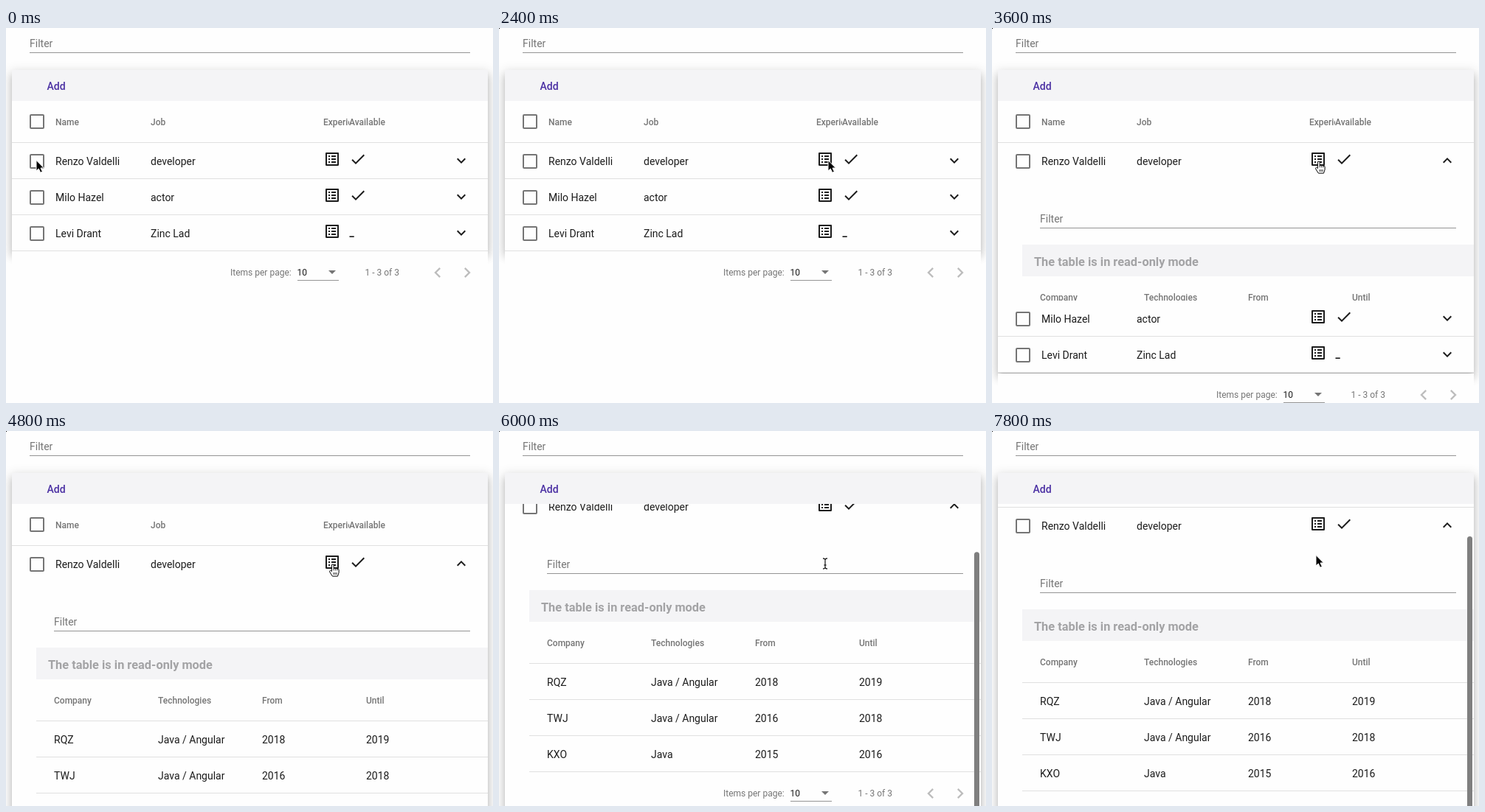
An HTML page for the animation above (8 s loop, 660x509 px).

```html
<!DOCTYPE html>
<html lang="en">
<head>
<meta charset="utf-8">
<title>Expandable table</title>
<style>
  html, body { margin: 0; width: 100%; height: 100%; overflow: hidden; background: #fefefe; }
  #view { position: relative; width: 100%; height: 100%; overflow: hidden; contain: strict; }
  #card {
    position: absolute; left: 8px; top: 57px; width: 645px; background: #fefefe;
    box-shadow: 0 5px 5px -3px #0003, 0 8px 10px 1px #00000024, 0 3px 14px 2px #0000001f;
  }
  svg { position: absolute; left: 0; top: 0; width: 660px; height: 509px; overflow: hidden; }
  text { font: 14px Roboto, sans-serif; fill: #1c1c1c; white-space: pre; }
  .hint { fill: #757575; }
  .head { font-size: 12px; font-weight: 500; fill: #757575; }
  .small { font-size: 12px; fill: #757575; }
  .dark { fill: #1c1c1c; }
  .bold { font-weight: 700; }
  .add { font-weight: 500; fill: #4a2fa3; }
  .title { font-size: 16.38px; font-weight: 700; fill: #a3a3a5; }
  .icon { fill: #1c1c1c; }
</style>
</head>
<body>
<div id="view">
  <div id="card"></div>
  <svg id="stage" viewBox="0 0 660 509"></svg>
</div>
<script>
const LIST = 'M19 5v14H5V5h14m1.1-2H3.9c-.5 0-.9.4-.9.9v16.2c0 .4.4.9.9.9h16.2c.4 0 .9-.5.9-.9V3.9c0-.5-.5-.9-.9-.9zM11 7h6v2h-6zm0 4h6v2h-6zm0 4h6v2h-6zM7 7h2v2H7zm0 4h2v2H7zm0 4h2v2H7z';
const CHECK = 'M9 16.2L4.8 12l-1.4 1.4L9 19 21 7l-1.4-1.4z';
const DOWN = 'M7.41 8.59L12 13.17l4.59-4.58L18 10l-6 6-6-6z';
const UP = 'M7.41 15.41L12 10.83l4.59 4.58L18 14l-6-6-6 6z';
const LEFT = 'M15.41 7.41L14 6l-6 6 6 6 1.41-1.41L10.83 12z';
const RIGHT = 'M10 6L8.59 7.41 13.17 12l-4.58 4.59L10 18l6-6z';

const text = (x, y, label, kind = '') => `<text x="${x}" y="${y}" class="${kind}">${label}</text>`;
const rect = (x, y, w, h, fill) => `<rect x="${x}" y="${y}" width="${w}" height="${h}" fill="${fill}"/>`;
const icon = (x, y, d, id = '') => `<path class="icon" id="${id}" d="${d}" transform="translate(${x} ${y})"/>`;
const rule = (y, x = 8) => rect(x, y, 653 - x, 1, '#e0e0e0');
const checkbox = y => `<rect x="33" y="${y - 9}" width="18" height="18" rx="1" fill="none" stroke="#757575" stroke-width="2"/>`;
const filterField = (x, y) => text(x, y, 'Filter', 'hint') + rect(x, y + 7, 629 - x, 1, '#949494');

const row = (y, name, job, available, id) =>
  checkbox(y) + text(67, y + 5, name) + text(196, y + 5, job) + icon(430, y - 15, LIST) +
  (available ? icon(465, y - 15, CHECK) : text(465.5, y + 3, '_', 'bold')) + icon(605, y - 13, DOWN, id);

const detailRow = (y, cells, kind) =>
  cells.map((cell, i) => text(65 + 141 * i, y, cell, kind)).join('');

const paginator = () =>
  text(304, 336, 'Items per page:', 'small') + text(394.5, 336, '10', 'small dark') +
  '<path d="M437 329h10l-5 5z" fill="#757575"/>' + rect(395, 342, 56, 1, '#949494') +
  text(486.5, 336, '1 - 3 of 3', 'small') +
  `<path d="${LEFT}" transform="translate(571 318) scale(1.167)" fill="#bdbdbd"/>` +
  `<path d="${RIGHT}" transform="translate(611 318) scale(1.167)" fill="#bdbdbd"/>`;

const detail = filterField(65, 264) +
  rect(41, 294, 612, 43, '#f4f4f6') + text(57, 323, 'The table is in read-only mode', 'title') +
  detailRow(370, ['Company', 'Technologies', 'From', 'Until'], 'head') + rule(393, 41) +
  [['RQZ', 'Java / Angular', 2018, 2019],
   ['TWJ', 'Java / Angular', 2016, 2018],
   ['KXO', 'Java', 2015, 2016]]
    .map((cells, i) => detailRow(424 + 49 * i, cells) + rule(442 + 49 * i, 41)).join('') +
  `<g transform="translate(0 238)">${paginator()}</g>`;

const stage = document.getElementById('stage');
stage.innerHTML = `
  <clipPath id="body"><rect x="0" y="99" width="653" height="410"/></clipPath>
  <clipPath id="reveal"><rect id="revealBox" x="8" y="205" width="645" height="0"/></clipPath>
  <clipPath id="column"><rect x="430" y="118" width="35" height="20"/></clipPath>
  ${filterField(32, 26)}
  <g clip-path="url(#body)"><g id="content">
    ${checkbox(127)}
    ${text(67, 132, 'Name', 'head')}${text(196, 132, 'Job', 'head')}
    <g clip-path="url(#column)">${text(430, 132, 'Experience', 'head')}</g>
    ${text(465, 132, 'Available', 'head')}${rule(155)}
    ${row(181, 'Renzo Valdelli', 'developer', true, 'toggle')}
    <g id="firstRule">${rule(204)}</g>
    <g clip-path="url(#reveal)">${detail}</g>
    <g id="rest">
      ${row(230, 'Milo Hazel', 'actor', true)}${rule(253)}
      ${row(279, 'Levi Drant', 'Zinc Lad', false)}${rule(302)}
    </g>
  </g></g>
  <g id="footer">${rect(8, 303, 645, 56, '#fefefe')}${paginator()}</g>
  ${rect(8, 57, 645, 42, '#f4f4f6')}${text(55.5, 84, 'Add', 'add')}
  <rect id="thumb" x="644" y="100" width="7" height="450" rx="3.5" fill="#7f7f7f"/>
  <g id="pointer" stroke-linejoin="round">
    <path id="arrow" d="M1 .5V15.1l3.3-3.1 2.4 5.3 2.7-1.2L7 11h4.4z" fill="#000" stroke="#fff"/>
    <g id="hand" fill="#fff" stroke="#000" transform="translate(1 1)">
      <path d="M-1.6 9.5V1.4a1.4 1.4 0 0 1 2.8 0V6q1-1.2 2.4-.3 1.2-.8 2.3.4 1.7-.5 2.2 1v4l-1.6 5H-.6l-3.4-5.2q-1.4-2 .5-2.4 1 .1 1.9 1z"/>
      <path d="M1.2 6v2.4M3.6 5.8v2.6M5.9 6.2v2.2M1 11v3M3 11v3M5 11v3" stroke-width=".8"/>
    </g>
    <path id="beam" d="M-3-7q3 0 3 2 0-2 3-2M0-5V5M-3 7q3 0 3-2 0 2 3 2M-1.5 2h3" fill="none" stroke="#222" stroke-width="1.3"/>
  </g>
  <rect id="dot" width="1" height="1"/>`;

// Piecewise linear value through [time, value] points.
function track(points, t) {
  const i = points.findIndex(p => p[0] > t);
  if (i === 0) return points[0][1];
  if (i < 0) return points[points.length - 1][1];
  const [t0, v0] = points[i - 1], [t1, v1] = points[i];
  return v0 + (v1 - v0) * (t - t0) / (t1 - t0);
}

const EXPAND = [[3400, 0], [3600, 165.4], [3800, 400]];
const SCROLL = [[5000, 0], [5200, 4], [5400, 18], [5600, 38], [5800, 61], [6000, 78],
  [6400, 75], [7200, 75], [7400, 73], [7600, 64], [7800, 52]];
const THUMB = [[5000, 0], [5200, 1], [6600, 1], [7000, 0], [7200, 0], [7400, 1]];
const POINTER_X = [[600, 40], [800, 62], [1000, 130], [1400, 310], [1600, 390], [1800, 432],
  [2000, 445], [2400, 445], [2800, 442], [6200, 442], [6600, 438]];
const POINTER_Y = [[2400, 179], [2800, 180], [6200, 180], [6600, 168]];

const el = id => document.getElementById(id);
const show = (id, on) => el(id).setAttribute('visibility', on ? 'visible' : 'hidden');
const move = (id, x, y) => el(id).setAttribute('transform', `translate(${x} ${y})`);

function render(now) {
  const t = Math.floor(now % 8000 / 200) * 200;
  const height = track(EXPAND, t), expand = Math.floor(height);
  const scroll = Math.round(track(SCROLL, t));

  el('card').style.height = 246 + expand + 'px';
  el('revealBox').setAttribute('height', expand);
  el('toggle').setAttribute('d', expand ? UP : DOWN);
  show('firstRule', !expand);
  move('content', 0, -scroll);
  move('rest', 0, expand);
  move('footer', 0, Math.ceil(height));
  el('thumb').setAttribute('y', 100 + 0.825 * scroll);
  el('thumb').setAttribute('opacity', track(THUMB, t));

  const shape = t < 2800 || t >= 6400 ? 'arrow' : t < 6000 ? 'hand' : 'beam';
  for (const id of ['arrow', 'hand', 'beam']) show(id, id === shape);
  move('pointer', track(POINTER_X, t), track(POINTER_Y, t));
  show('dot', t >= 1400);
  requestAnimationFrame(() => render(performance.now()));
}
render(performance.now());
</script>
</body>
</html>
```
